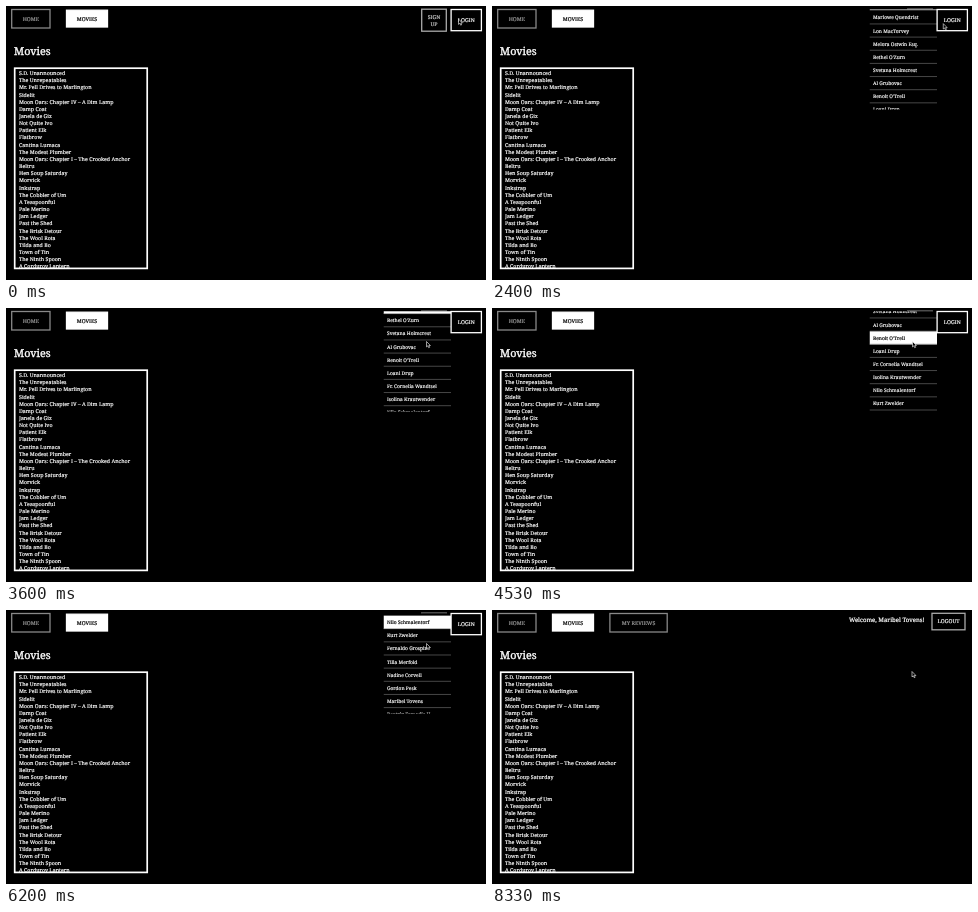
Recreate the animation shown at these times as an HTML page. Size 480 by 274 pixels, loop 9740 ms.

```html
<!DOCTYPE html>
<html lang="en">
<head>
<meta charset="utf-8">
<title>Movies</title>
<style>
  html, body { margin: 0; width: 100%; height: 100%; overflow: hidden; background: #000; }
  svg { display: block; width: 100vw; height: 100vh; }
  text {
    font-family: "Roboto Slab", "Noto Serif", serif; text-rendering: geometricPrecision;
    color: #fff; fill: currentColor; stroke: currentColor; stroke-width: .035em;
  }
  .row rect { fill: none; }
  .row line { stroke: #777; stroke-width: .6; }
  .row.hover rect { fill: #fff; }
  .row.hover text { color: #000; }
</style>
</head>
<body>
<svg id="stage" viewBox="0 0 480 274">
  <defs>
    <clipPath id="menuClip"><rect x="377.5" y="3.2" width="67.5" height="100.3"/></clipPath>
    <clipPath id="movieClip"><rect x="9" y="62" width="132" height="200"/></clipPath>
  </defs>
  <rect width="480" height="274"/>
</svg>
<script>
const LOOP = 9740, FRAME = 1000 / 15;
const ROW_TOP = 5.1, ROW_HEIGHT = 13.15;
const MENU_OPENS = 24, LOGGED_IN = 117;

const movies = [
  "S.D. Unannounced", "The Unrepeatables", "Mr. Pell Drives to Marlington", "Sidelit",
  "Moon Oars: Chapter IV – A Dim Lamp", "Damp Coat", "Janela de Giz", "Not Quite Ivo",
  "Patient Elk", "Flatbrow", "Cantina Lumaca", "The Modest Plumber",
  "Moon Oars: Chapter I – The Crooked Anchor", "Beltru", "Hen Soup Saturday", "Morvick",
  "Inkstrap", "The Cobbler of Um", "A Teaspoonful", "Pale Merino", "Jam Ledger",
  "Past the Shed", "The Brisk Detour", "The Wool Rota", "Tilda and Bo", "Town of Tin",
  "The Ninth Spoon", "A Corduroy Lantern"
];
const users = [
  "Marlowe Quendrist", "Lon MacTorvey", "Melora Ostwin Esq.", "Bethel O'Zurn",
  "Svetana Holmcrest", "Al Grubovac", "Benoit O'Trell", "Loani Drup",
  "Fr. Cornelia Wandtsel", "Isolina Krautwender", "Nilo Schmalentorf", "Kurt Zwelder",
  "Fernaldo Grospin", "Tilla Merfold", "Nadine Corvell", "Gordon Pesk",
  "Maribel Tovens", "Beatrix Fomadie II"
];

// Pointer path: step, x, y
const path = [
  [0, 452.5, 13], [4, 431, 17], [8, 432, 37], [13, 452.5, 17],
  [35.2, 452.5, 17], [42, 420.5, 33.5], [99, 420.5, 33.5], [110, 420, 61.5], [147, 420, 61.5]
];
// Menu scrolls: first step, last step, from, to, ease-out power
const scrolls = [
  [49, 58, 0, 60.6, 1.25], [69, 77, 60.6, 114.8, 1.25], [91, 97, 114.8, 157.9, 1.14]
];
// Steps at which hovering catches up with the scrolled list
const hoverUpdates = [[0, 0], [62, 60.6], [82, 114.8], [100, 157.9]];

const stage = document.getElementById("stage");

function add(parent, tag, attrs = {}, content = "") {
  const node = document.createElementNS("http://www.w3.org/2000/svg", tag);
  for (const key in attrs) node.setAttribute(key, attrs[key]);
  node.textContent = content;
  parent.append(node);
  return node;
}

function label(parent, content, x, middle, size, attrs = {}) {
  return add(parent, "text", { x, y: middle + size * .36, "font-size": size, ...attrs }, content);
}

function button(parent, lines, x, y, width, height, stroke, color = "#fff", fill = "#000") {
  const box = add(parent, "rect", { x, y, width, height, fill, stroke, "stroke-width": 1.3 });
  lines.forEach((line, i) =>
    label(parent, line, x + width / 2, y + height / 2 + (i - (lines.length - 1) / 2) * 7.2, 5.3,
      { "text-anchor": "middle", style: `color:${color}` }));
  return box;
}

button(stage, ["HOME"], 5.7, 3.5, 38.3, 18.5, "#888", "#999");
button(stage, ["MOVIES"], 60.5, 4.2, 41, 16.8, "#fff", "#000", "#fff");
label(stage, "Movies", 8, 45, 10.8);
add(stage, "rect", { x: 8.7, y: 62.2, width: 132.5, height: 200.2, fill: "none", stroke: "#fff", "stroke-width": 1.7 });
const movieList = add(stage, "g", { "clip-path": "url(#movieClip)" });
movies.forEach((title, i) => label(movieList, title, 13, 67.1 + i * 7.165, 5.3));

const guest = add(stage, "g");
const signUp = button(guest, ["SIGN", "UP"], 415.7, 3.2, 24.6, 22, "#aaa", "#ccc");
const menu = add(guest, "g", { "clip-path": "url(#menuClip)" });
add(menu, "rect", { x: 377, y: 3, width: 68, height: 101 });
const list = add(menu, "g");
add(list, "rect", { x: 377.5, y: 3.2, width: 67.5, height: 1, fill: "#ddd" });
const rows = users.map((name, i) => {
  const row = add(list, "g", { class: "row" }), y = ROW_TOP + i * ROW_HEIGHT;
  add(row, "rect", { x: 377.5, y, width: 67.5, height: ROW_HEIGHT });
  add(row, "line", { x1: 377.5, x2: 445, y1: y + ROW_HEIGHT - .3, y2: y + ROW_HEIGHT - .3 });
  label(row, name, 381, y + ROW_HEIGHT / 2, 4.9);
  return row;
});
const login = button(guest, ["LOGIN"], 445.1, 3.5, 30.3, 21.2, "#fff");

const member = add(stage, "g");
button(member, ["MY REVIEWS"], 117.9, 3.5, 57.3, 18.5, "#888", "#999");
label(member, "Welcome, Maribel Tovens!", 432.5, 10, 6, { "text-anchor": "end" });
button(member, ["LOGOUT"], 440, 3.3, 33, 16.5, "#aaa");

const pointer = add(stage, "path", {
  d: "M0 0V5.4L1.3 4.3 2.2 6.2 3.1 5.8 2.3 4H3.9Z", fill: "#000", stroke: "#fff", "stroke-width": .6
});

const clamp = u => Math.min(1, Math.max(0, u));
const show = (node, on) => node.setAttribute("display", on ? "inline" : "none");

function pointerAt(step) {
  const i = path.findIndex((_, k) => k + 1 < path.length && step <= path[k + 1][0]);
  const [s0, x0, y0] = path[i], [s1, x1, y1] = path[i + 1];
  const u = clamp((step - s0) / (s1 - s0)), e = u * u * (3 - 2 * u);
  return [x0 + (x1 - x0) * e, y0 + (y1 - y0) * e];
}

function scrollAt(step) {
  return scrolls.reduce((sum, [start, end, from, to, power]) =>
    sum + (to - from) * (1 - (1 - clamp((step - start) / (end - start))) ** power), 0);
}

function draw(time) {
  const step = Math.floor((time % LOOP + 4) / FRAME);
  const [x, y] = pointerAt(step);
  const open = step >= MENU_OPENS;

  show(guest, step < LOGGED_IN);
  show(member, step >= LOGGED_IN);
  show(menu, open);
  pointer.setAttribute("transform", `translate(${x} ${y})`);

  const overLogin = x > 444 && y < 26;
  const overSignUp = !open && x > 415 && x < 441 && y < 26;
  login.setAttribute("stroke", open || overLogin ? "#fff" : "#aaa");
  signUp.setAttribute("stroke", overSignUp ? "#fff" : "#aaa");

  list.setAttribute("transform", `translate(0 ${-scrollAt(step)})`);
  const [, settled] = hoverUpdates.filter(([start]) => step >= start).pop();
  const hovered = x < 445 ? Math.floor((y - ROW_TOP + settled) / ROW_HEIGHT) : -1;
  rows.forEach((row, i) => row.classList.toggle("hover", i === hovered));
}

const began = performance.now();
(function tick() {
  draw(performance.now() - began);
  requestAnimationFrame(tick);
})();
</script>
</body>
</html>
```
